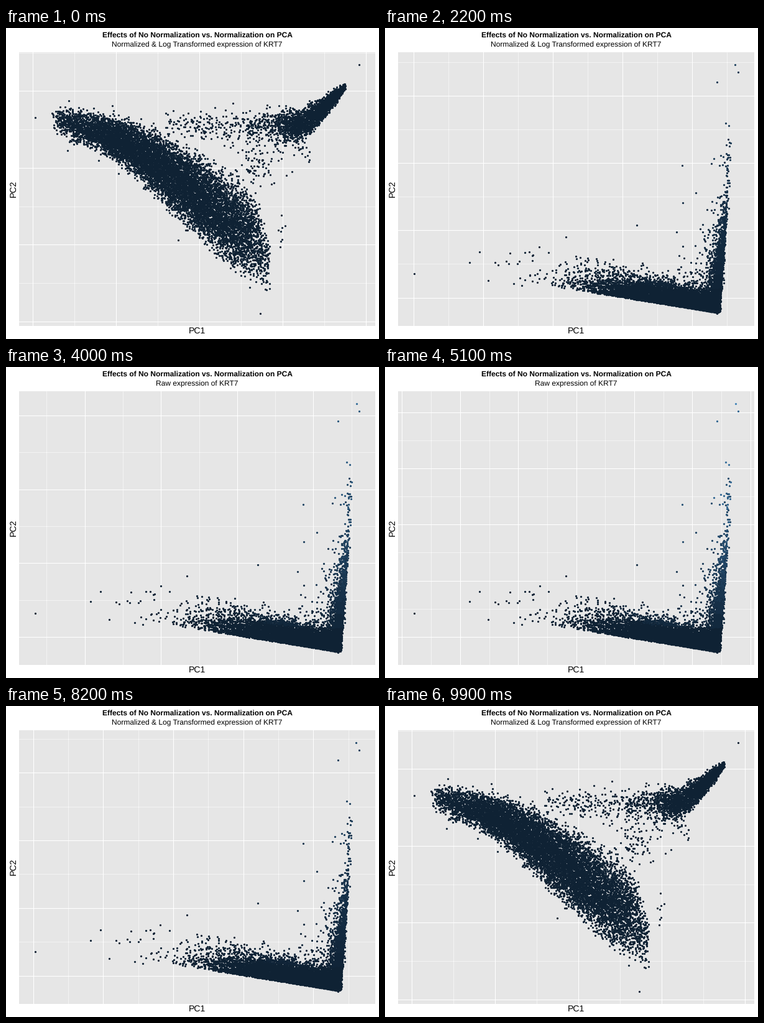
These frames come from a looping animation (600 px wide and 500 px high, 10 s). A matplotlib script:

```python
import math

import matplotlib.pyplot as plt
import numpy as np
from matplotlib.animation import FuncAnimation
from matplotlib.patches import Rectangle

PX = 0.72  # points per pixel at 100 dpi
LEFT, TOP, RIGHT, BOTTOM = 21, 39, 594, 478.5
SHADE = 0.78
LOW = np.array([0x13, 0x2B, 0x43]) / 255 * SHADE
HIGH = np.array([0x56, 0xB1, 0xF7]) / 255 * SHADE
BINS = 16
NORMALIZED = "Normalized & Log Transformed expression of KRT7"
RAW = "Raw expression of KRT7"

plt.rcParams["font.family"] = "Liberation Sans"
plt.rcParams["text.hinting"] = "none"
rng = np.random.default_rng(7)


def band(x, keys):
    """Scatter y around a curve; keys hold (x, middle, spread)."""
    kx, middle, spread = np.array(keys, float).T
    g = 3 * np.tanh(rng.normal(size=len(x)) / 3)
    y = np.interp(x, kx, middle) + g * np.interp(x, kx, spread)
    return np.column_stack([x, y])


def blob(n, x, y, sx, sy):
    return np.column_stack([rng.normal(x, sx, n), rng.normal(y, sy, n)])


def normalized_cloud():
    body = [(70, 145, 11), (150, 168, 15), (200, 190, 20), (250, 225, 26),
            (300, 264, 31), (350, 302, 34), (400, 336, 34), (425, 387, 21)]
    main = band(70 + 355 * rng.beta(2.1, 1.75, 10400), body)
    loose = [(x, y, 1.7 * s) for x, y, s in body]
    halo = band(rng.uniform(80, 330, 90), loose)
    bridge = band(rng.uniform(255, 410, 170), [(255, 158, 13), (410, 156, 13)])
    link = blob(60, 395, 215, 18, 24)
    veil = band(rng.uniform(390, 490, 70), [(390, 215, 26), (490, 190, 20)])
    drops = blob(8, 444, 335, 5, 16)
    wisp = np.column_stack([475 - 42 * np.abs(rng.normal(size=520)),
                            rng.normal(156, 12, 520)])
    wing = band(432 + 114 * rng.beta(2.6, 1.5, 2000),
                [(432, 157, 13), (470, 157, 13), (490, 146, 12),
                 (510, 128, 9), (530, 111, 6), (546, 93, 2)])
    corners = [(47, 144), (568, 59), (409, 459)]
    return np.vstack([main, halo, bridge, link, veil, drops, wisp, wing, corners])


def raw_cloud(n):
    def floor(x):
        return 458 - 0.16 * np.maximum(534 - x, 0)

    corners = [(405, 318), (47, 396), (564, 59), (568, 71), (534, 459)]
    left = blob(12, 200, 392, 38, 15)
    n_base = int(n * 0.7)
    d = 88 * np.abs(rng.normal(size=n_base))
    x = 535 - d
    y = floor(x) - np.abs(rng.normal(size=n_base)) * (12 + 0.04 * d)
    base = np.column_stack([x, y])

    n_arm = n - n_base - len(left) - len(corners)
    h = rng.exponential(46, n_arm) % 380
    spread = np.where(rng.random(n_arm) < 0.16, 20, 5)
    x = 536 + 0.085 * np.minimum(h, 220) - rng.exponential(spread) + rng.normal(0, 1.5, n_arm)
    arm = np.column_stack([x, np.minimum(458 - h, floor(x))])
    return np.vstack([base, arm, left, corners])


def axis_breaks(lo, hi, want=5):
    """Nice breaks scored by simplicity, coverage and density."""
    span = hi - lo
    power = 10 ** math.floor(math.log10(span))
    best, pick = -1e9, None
    for scale in (power / 10, power):
        for rank, q in enumerate((1, 5, 2, 2.5, 4, 3)):
            step = q * scale
            first, last = math.floor(lo / step), math.ceil(hi / step)
            for i in range(first, first + 3):
                for j in range(max(i + 1, last - 2), last + 1):
                    a, b = i * step, j * step
                    simple = 1 - rank / 5 + (i <= 0 <= j)
                    cover = 1 - 0.5 * ((hi - b) ** 2 + (lo - a) ** 2) / (0.1 * span) ** 2
                    ratio = (max(b, hi) - min(a, lo)) / step / (want - 1)
                    dense = 2 - max(ratio, 1 / ratio)
                    score = 0.25 * simple + 0.2 * cover + 0.5 * dense
                    if score > best:
                        best, pick = score, (i, j, step)
    i, j, step = pick
    return np.arange(i, j + 1) * step, (np.arange(i - 1, j + 1) + 0.5) * step


# Clouds are laid out in pixels, then turned into data units around each origin.
norm_px = normalized_cloud()
raw_px = raw_cloud(len(norm_px))
norm = (norm_px - (311, 225)) * (0.3724, -0.4045)
raw = (raw_px - (494.5, 434.3)) * (535.2, -552.9)

rise = np.clip((430 - raw_px[:, 1]) / 310, 0, 1)
side = np.clip((raw_px[:, 0] - 330) / 150, 0, 1)
level = rise * side * rng.uniform(0.5, 1.0, len(raw))
bins = np.round(level * (BINS - 1)).astype(int)

fig = plt.figure(figsize=(6, 5), dpi=100, facecolor="white")
ax = fig.add_axes([0, 0, 1, 1])
ax.set_xlim(0, 600)
ax.set_ylim(500, 0)
ax.axis("off")
panel = Rectangle((LEFT, TOP), RIGHT - LEFT, BOTTOM - TOP, fc="#E6E6E6", lw=0)
ax.add_patch(panel)

minor, = ax.plot([], [], color="white", lw=0.53 * PX, zorder=2)
major, = ax.plot([], [], color="white", lw=1.07 * PX, zorder=2.1)
for line in (minor, major):
    line.set_clip_path(panel)
dots = [ax.plot([], [], "o", ms=3.2 * PX, mew=0, zorder=3)[0] for _ in range(BINS)]
members = [np.flatnonzero(bins == b) for b in range(BINS)]


def label(x, y, text, size, **style):
    return ax.text(x, y, text, fontsize=size * PX, ha="center", va="baseline", **style)


label(308, 15, "Effects of No Normalization vs. Normalization on PCA", 12, weight="bold")
subtitle = label(307.5, 31, NORMALIZED, 12)
label(307.5, 491, "PC1", 14)
label(16, 258, "PC2", 14, rotation=90, rotation_mode="anchor")


def grid_path(xs, ys):
    gx, gy = [], []
    for x in xs:
        gx += [x, x, np.nan]
        gy += [TOP, BOTTOM, np.nan]
    for y in ys:
        gx += [LEFT, RIGHT, np.nan]
        gy += [y, y, np.nan]
    return gx, gy


def inside(values, a, b):
    return [v for v in values if a <= v <= b]


def update(frame):
    t = np.interp(frame, [0, 8, 50, 58, 99], [0, 0, 1, 1, 0])
    data = (1 - t) * norm + t * raw
    lo, hi = data.min(axis=0), data.max(axis=0)
    pad = (hi - lo) * 0.05
    lo, hi = lo - pad, hi + pad

    def to_x(v):
        return LEFT + (v - lo[0]) / (hi[0] - lo[0]) * (RIGHT - LEFT)

    def to_y(v):
        return BOTTOM - (v - lo[1]) / (hi[1] - lo[1]) * (BOTTOM - TOP)

    x_ticks = axis_breaks(lo[0], hi[0])
    y_ticks = axis_breaks(lo[1], hi[1])
    for line, vx, vy in zip((major, minor), x_ticks, y_ticks):
        line.set_data(*grid_path(inside(to_x(vx), LEFT, RIGHT),
                                 inside(to_y(vy), TOP, BOTTOM)))

    x, y = to_x(data[:, 0]), to_y(data[:, 1])
    for b, (dot, ids) in enumerate(zip(dots, members)):
        dot.set_data(x[ids], y[ids])
        dot.set_markerfacecolor(tuple(LOW + (HIGH - LOW) * t * b / (BINS - 1)))
    subtitle.set_text(RAW if t >= 0.5 else NORMALIZED)
    return [major, minor, subtitle, *dots]


anim = FuncAnimation(fig, update, frames=100, interval=100, repeat=True)
plt.show()
```
